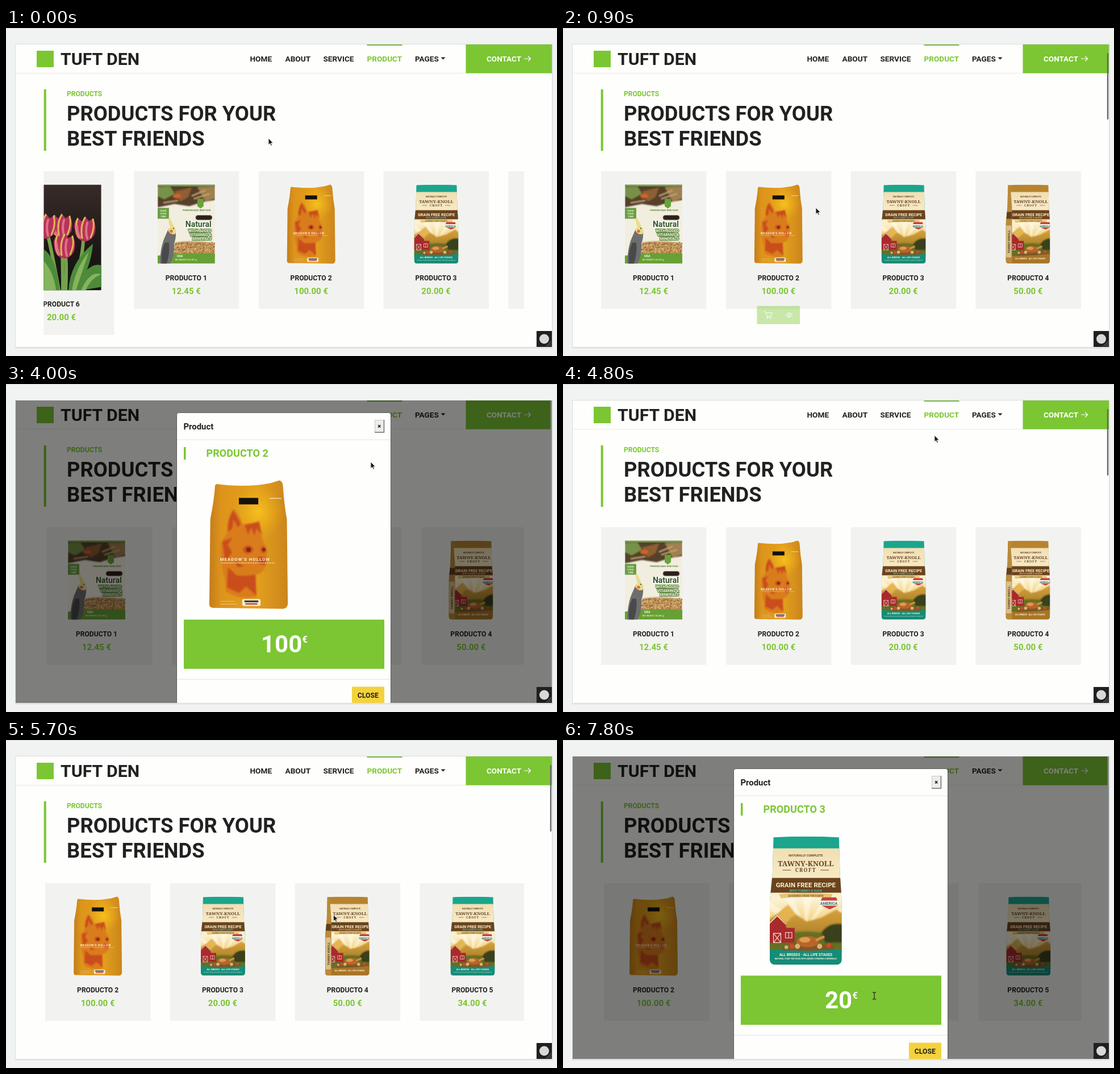
Write an HTML page that moves like this. It is 970x577 px and loops after 8 s.

```html
<!DOCTYPE html>
<html lang="en">
<head>
<meta charset="utf-8">
<title>Shop carousel</title>
<style>
html, body { margin: 0; width: 100%; height: 100%; overflow: hidden; background: #f0f3f2; }
svg { display: block; width: 100%; height: 100%; }
text { font-family: Roboto, sans-serif; font-weight: 700; white-space: pre; }
.mid { text-anchor: middle; }
.serif { font-family: "Noto Serif", serif; }
.line { fill: none; stroke-linecap: round; stroke-linejoin: round; }
</style>
</head>
<body>
<svg viewBox="0 0 970 577">
<defs>
  <clipPath id="track"><rect x="66.5" y="240" width="845.5" height="315"/></clipPath>
  <clipPath id="page"><rect x="17" y="29" width="944" height="532"/></clipPath>
  <clipPath id="birdClip"><rect width="101" height="139"/></clipPath>
  <clipPath id="bagClip"><path d="M4 1Q39-1 75 1L76 40 78 70V134Q77 139 72 139H6Q1 139 0 134V70L3 40Z"/></clipPath>
  <clipPath id="tulipClip"><rect width="139.5" height="186"/></clipPath>
  <filter id="soft"><feGaussianBlur stdDeviation=".9"/></filter>
  <linearGradient id="gold"><stop offset="0" stop-color="#c47d1b"/><stop offset=".15" stop-color="#dd941b"/><stop offset=".6" stop-color="#e3a01c"/><stop offset="1" stop-color="#cb851c"/></linearGradient>
  <radialGradient id="glow"><stop offset="0" stop-color="#f5c01d"/><stop offset="1" stop-color="#f0b01a" stop-opacity="0"/></radialGradient>
  <linearGradient id="dark" x2="0" y2="1"><stop offset="0" stop-color="#382c29"/><stop offset=".6" stop-color="#1d1715"/><stop offset="1" stop-color="#121510"/></linearGradient>
  <linearGradient id="sky" x2="0" y2="1"><stop offset="0" stop-color="#f1dfb2"/><stop offset=".5" stop-color="#fbf1d2"/><stop offset=".7" stop-color="#f4d583"/></linearGradient>
  <linearGradient id="peak" x2="0" y2="1"><stop offset="0" stop-color="#dda63e"/><stop offset=".5" stop-color="#b98b2f"/><stop offset="1" stop-color="#59611f"/></linearGradient>

  <g id="bird" clip-path="url(#birdClip)">
    <rect width="101" height="139" fill="#f2eedf"/>
    <g filter="url(#soft)">
      <path d="M0 0H101V27L78 31 56 38 30 34 0 40Z" fill="#54402c"/>
      <path d="M0 4L22 3 30 16 12 26 0 20Z" fill="#77914a"/>
      <path d="M70 4L101 3V24L84 30Z" fill="#a08050"/>
      <path d="M30 12L60 5 54 22 40 30Z" fill="#8d5e32"/>
      <ellipse cx="34" cy="20" rx="7" ry="4" fill="#d2622c"/>
      <path d="M60 20L84 10M64 25L92 16M10 32L36 28" stroke="#c6a872" stroke-width="2"/>
      <path d="M30 102Q60 97 101 103V126H30Z" fill="#bd9055"/>
    </g>
    <rect width="101" height="3" fill="#6fa541"/>
    <path d="M70 25H81V38L75.500 42 70 38Z" fill="#68a33a"/>
    <rect y="41" width="20" height="19" fill="#6a9f45"/>
    <g class="mid" fill="#e9f2dc" font-size="4.200"><text x="10" y="47">GOOD</text><text x="10" y="52">FOOD</text><text x="10" y="57">TIME</text></g>
    <text x="44" y="46" font-size="3.900" fill="#518a2e">PREMIUM DAILY BIRD FOOD</text>
    <g id="seeds"></g>
    <path d="M0 125Q50 118 101 122V139H0Z" fill="#67a034"/>
    <rect x="67" y="54" width="29" height="8" rx="4" fill="#2c211b" stroke="#8d7864"/>
    <g text-anchor="end" paint-order="stroke" stroke-width="2">
      <text x="95" y="74.500" font-size="14" fill="#36572a" stroke="#fff">Natural</text>
      <g font-size="6.900" fill="#f1f5e2" stroke="#5c8440"><text x="95" y="83.500">WITH ADDED</text><text x="95" y="90.500">VITAMINS &amp;</text><text x="95" y="97.500">MINERALS</text></g>
    </g>
    <text x="34" y="127.500" font-size="5.500" fill="#fff">USA</text>
    <text x="31" y="133" font-size="3.300" fill="#dcecc8">NET WEIGHT 2 LB (907 g)</text>
    <path d="M19 78Q29 74 32 82 33 94 29 104 31 124 22 139H4Q5 110 12 94Z" fill="#6f6e6e"/>
    <path d="M13 102Q5 118 7 139H16Q22 120 20 102Z" fill="#48494b"/>
    <path d="M22 75Q18 65 20 56 25 65 29 74 35 79 31 87 22 89 18 80Z" fill="#eadc8c"/>
    <circle cx="24" cy="82" r="2.800" fill="#dc7434"/><circle cx="28" cy="77" r="1" fill="#222"/>
  </g>

  <g id="cat">
    <path d="M8 4Q40 8 66 3L76 0Q80 1 80 9 81 26 84 42L85 134Q84 139 80 139L4 138Q0 138 0 134L1 42Q5 22 6 8 6 4 8 4Z" fill="url(#gold)"/>
    <ellipse cx="53" cy="34" rx="28" ry="30" fill="url(#glow)"/>
    <g filter="url(#soft)">
      <path d="M26 31Q32 35 36 48L47 46 54 44Q55 57 58 65L63 76 62 91Q58 101 50 102L51 126Q30 130 18 120L17 108Q10 85 13 66L20 56Q20 38 26 31Z" fill="#d97d1d"/>
      <g fill="#c8461a" opacity=".85">
        <path d="M26 32Q19 42 20 56L25 52 26 42 31 51 34 47ZM38 48L54 45 57 59 51 52 49 60 45 51 42 59ZM14 66L25 62 20 70 25 78 17 88Z"/>
        <path d="M20 94L30 103 42 103 50 102 51 125 40 115 32 122 19 116ZM28 87L38 93 30 94ZM53 82L62 84 60 92 53 90Z"/>
        <ellipse cx="42" cy="75" rx="5.500" ry="4.500"/><ellipse cx="58.500" cy="75" rx="3" ry="4"/>
      </g>
    </g>
    <g fill="#862a14"><circle cx="42.500" cy="75" r="2.500"/><circle cx="59" cy="75" r="1.800"/></g>
    <rect x="32" y="19" width="21" height="7" fill="#15120c"/>
    <path d="M65 19.500H78" stroke="#f9e7bc" stroke-width=".8"/>
    <text x="11.500" y="87" font-size="4.700" letter-spacing=".7" fill="#fff1d8">MEADOW'S HOLLOW</text>
    <path d="M13 89.500H71" stroke="#f8d9a8" stroke-width=".7" stroke-dasharray="2 .6"/>
    <path d="M12 131H28M12 134H30" stroke="#e4b870" stroke-width=".8"/>
    <rect x="35.500" y="128.500" width="20" height="7.500" rx="2" fill="#f3ead8"/>
    <rect x="38" y="130" width="15" height="2" fill="#4b3a2c"/><rect x="39" y="133" width="13" height="1.500" fill="#b64a33"/>
  </g>

  <g id="scene">
    <rect y="13" width="78" height="111" fill="url(#sky)"/>
    <g filter="url(#soft)">
      <path d="M39 100L0 70V80ZM39 100L14 64H24ZM39 100L36 64H46ZM39 100L60 64H70ZM39 100L78 78V88Z" fill="#fffbea" opacity=".6"/>
      <path d="M-2 90L8 84 20 74 28 84 40 92 56 88 72 79 80 84V127H-2Z" fill="url(#peak)"/>
      <path d="M20 75L28 85 23 88 17 95 8 86Z" fill="#eabb56" opacity=".8"/>
      <path d="M-2 111Q30 100 54 104L80 100V127H-2Z" fill="#657024"/>
      <path d="M56 104Q64 92 80 95V115H60Z" fill="#38401b"/>
    </g>
    <path d="M0 93L8 86 17 94 18 99H27V115H0Z" fill="#a92a2c"/>
    <path d="M0 94L8 86 17 95" stroke="#f3e6dc" class="line" stroke-width=".8"/>
    <path d="M4 105H12V115H4ZM4 105L12 115M12 105L4 115M17 104H24V110H17ZM20.500 104V110" stroke="#f4dfd4" stroke-width=".7" fill="none"/>
    <path d="M14 121Q26 113 40 115L70 118V126H14Z" fill="#7c5a27"/>
    <ellipse cx="41" cy="114" rx="12" ry="6" fill="#b9642a"/><ellipse cx="38" cy="112" rx="6" ry="3" fill="#df9a50"/>
    <path d="M51 112L58 109" stroke="#d88a44" stroke-width="3" stroke-linecap="round"/>
    <g fill="#cf4b2c"><circle cx="24" cy="119" r="2.500"/><circle cx="64" cy="118" r="2.500"/></g>
    <g fill="#d9b270"><circle cx="30" cy="119" r="2.800"/><circle cx="54" cy="119" r="2.800"/><circle cx="18" cy="120" r="2"/></g>
    <g class="mid" fill="#644329">
      <text x="39" y="22" font-size="3.400">NATURALLY COMPLETE</text>
      <text class="serif" x="39" y="32.500" font-size="7.800">TAWNY-KNOLL</text>
      <text class="serif" x="39" y="38.500" font-size="5.400" letter-spacing=".9">CROFT</text>
    </g>
    <path d="M14 36.500H23M55 36.500H64" stroke="#8b6840" stroke-width=".8"/>
    <rect y="45" width="78" height="16" fill="#6a431d"/>
    <text class="mid" x="39" y="55" font-size="7.100" fill="#fbefcd">GRAIN FREE RECIPE</text>
    <path d="M10 62.500Q39 60 68 62.500L66 67Q39 64.500 12 67Z" fill="#e6c578"/>
    <text class="mid" x="39" y="65.500" font-size="2.800" fill="#815d29">GOODNESS FROM THE EARTH</text>
    <path d="M57 66H72L73.500 70V75L65 79 55 74.500V70Z" fill="#c9403e"/>
    <rect x="54" y="69.500" width="20" height="5.500" fill="#f7f3e5"/>
    <text class="mid" x="64" y="74" font-size="4.300" fill="#28786f">AMERICA</text>
  </g>
  <g id="teal" clip-path="url(#bagClip)">
    <rect width="78" height="139" fill="#1ba58d"/>
    <use href="#scene"/>
    <text class="mid" x="39" y="59.700" font-size="3.500" fill="#3fc3b0">WITH TURKEY &amp; DUCK</text>
    <path d="M0 122Q39 126 78 122V139H0Z" fill="#168c78"/>
    <g class="mid" fill="#f5f4df"><text x="39" y="129.500" font-size="4">ALL BREEDS · ALL LIFE STAGES</text><text x="39" y="133" font-size="2.300">NATURAL FOOD FOR DOGS WITH ADDED VITAMINS &amp; MINERALS</text></g>
  </g>
  <g id="brown" clip-path="url(#bagClip)">
    <rect width="78" height="139" fill="#b8832e"/>
    <use href="#scene" x="5"/>
    <text class="mid" x="44" y="59.700" font-size="3.300" fill="#e5b24b">WITH CHICKEN &amp; SALMON</text>
    <path d="M0 125Q39 127 78 122V139H0Z" fill="#a87528"/>
    <path d="M0 0H8L11 40V139H0Z" fill="#b98a3c"/>
    <path d="M1 48H10.500V60H1Z" fill="#5f3f1d"/><path d="M1 72H10V128H1Z" fill="#d9bf8c"/>
    <text transform="translate(8 121) rotate(-90)" font-size="6" fill="#5d4226">TAWNY-KNOLL</text>
    <text class="mid" x="43" y="131" font-size="3.700" fill="#fff0cc">ALL BREEDS · ALL LIFE STAGES</text>
  </g>

  <g id="bloom">
    <path d="M-19-4Q-20-14-13-20L-5-14 0-23 7-15 14-19Q21-8 17 8 10 21 0 21-12 20-17 8Z" fill="#b8325a"/>
    <path d="M-13-19Q-19-4-11 14M0-21Q-9-6-5 15M14-18Q18-4 10 14" class="line" stroke="#dcb658" stroke-width="3"/>
    <path d="M4-12Q0 2 4 16M-14-6Q-14 4-9 14" class="line" stroke="#de7189" stroke-width="4"/>
  </g>
  <g id="tulip" clip-path="url(#tulipClip)">
    <rect width="140" height="186" fill="url(#dark)"/>
    <path d="M46 90Q55 130 65 186M70 98Q72 130 72 186M77 125Q79 150 77 186M108 98Q106 140 86 186" class="line" stroke="#74a34b" stroke-width="6"/>
    <path d="M36 112Q62 128 66 186H36ZM82 186Q84 138 125 104 121 150 95 186ZM92 186Q115 134 140 142V180L104 186Z" fill="#4d8b3a"/>
    <path d="M36 132Q56 152 60 186H36ZM88 186Q95 145 118 118 107 150 95 186ZM104 186Q120 150 140 158 122 164 112 186Z" fill="#85b45c"/>
    <use href="#bloom" x="70" y="74"/><use href="#bloom" x="42" y="74"/><use href="#bloom" x="111" y="79"/><use href="#bloom" x="75" y="109"/>
  </g>
  <g id="tools">
    <path d="M354 488H356.500L359 496H366L368 490H357.500" class="line" stroke="#fff"/>
    <circle cx="360" cy="499" r="1.200" fill="none" stroke="#fff"/><circle cx="365" cy="499" r="1.200" fill="none" stroke="#fff"/>
  </g>
  <g id="eye" class="line"><path d="M392 494Q398 486 404 494 398 502 392 494Z"/><circle cx="398" cy="494" r="2"/></g>
</defs>

<rect width="970" height="577" fill="#f0f3f2"/>
<rect width="970" height="1" fill="#d9dcdb"/>
<rect x="16" y="29" width="947" height="535" fill="#e3e6e5"/>
<rect x="16.500" y="28.500" width="945" height="533" fill="#fefefc" stroke="#dadddc"/>
<g clip-path="url(#page)">
  <path d="M17 79.500H961" stroke="#e9ebea"/>
  <rect x="54" y="40" width="30" height="29" fill="#7bc632"/>
  <text x="96" y="65" font-size="30.300" fill="#212121">TUFT DEN</text>
  <g font-size="13.600" fill="#212121">
    <text x="429.500" y="59">HOME</text><text x="491.500" y="59">ABOUT</text><text x="558.500" y="59">SERVICE</text>
    <text x="635.500" y="59" fill="#7bc632">PRODUCT</text><text x="720" y="59">PAGES</text>
  </g>
  <path d="M765.500 51.500H773.500L769.500 55.500Z" fill="#212121"/>
  <rect x="635.500" y="29" width="62" height="2" fill="#7bb948"/>
  <rect x="809.500" y="29" width="151.500" height="50.500" fill="#7bc632"/>
  <text x="846" y="59" font-size="13.500" fill="#fff">CONTACT</text>
  <path d="M912.500 54H923.500M919.500 50L923.500 54 919.500 58" class="line" stroke="#fff" stroke-width="1.200"/>
  <rect x="66.700" y="108" width="4" height="108" fill="#7bc632"/>
  <text x="107" y="119.500" font-size="12.100" fill="#7bc632">PRODUCTS</text>
  <g font-size="36.400" fill="#212121"><text x="107" y="163">PRODUCTS FOR YOUR</text><text x="107" y="207">BEST FRIENDS</text></g>
  <g id="cards" clip-path="url(#track)"></g>
  <g id="bar">
    <g><rect x="341.500" y="478" width="75.500" height="32" fill="#7bc632"/><rect id="half" x="379" y="478" width="38" height="32" fill="#92d04f"/></g>
    <use href="#tools"/><use id="look" href="#eye"/>
  </g>
  <rect id="thumb" x="957.800" y="44" width="2.400" height="117" rx="1.200" fill="#666866"/>
  <g id="modal">
    <rect x="17" y="29" width="944" height="532" opacity=".5"/>
    <rect x="958.500" y="29" width="2.500" height="532" fill="#858784"/>
    <rect x="300.500" y="50.500" width="377" height="530" rx="4" fill="#fefefc" stroke="#5d5e5c"/>
    <path d="M301 98H677M301 519.500H677" stroke="#e2e5e7"/>
    <text x="312.500" y="79.500" font-size="14.900" fill="#212121">Product</text>
    <path d="M649.500 63.500H665V85H649.500Z" fill="#ececea" stroke="#c9c9c7"/><path d="M649 85H665.500V63" fill="none" stroke="#777" stroke-width="1.500"/>
    <text class="mid" x="657.200" y="78" font-size="11">×</text>
    <rect x="313" y="111" width="3.500" height="22" fill="#7bc632"/>
    <text id="name" x="352.500" y="128" font-size="18.100" fill="#7bc632"></text>
    <use id="photo"/>
    <rect x="313" y="414.500" width="353" height="86.500" fill="#7bc632"/>
    <text class="mid" x="490" y="472" font-size="42" fill="#fff"><tspan id="sum"></tspan><tspan font-size="17" dy="-17">€</tspan></text>
    <rect x="609" y="532.500" width="57" height="40" fill="#f4d23c"/>
    <text class="mid" x="637.300" y="551.500" font-size="12.200" fill="#212121">CLOSE</text>
  </g>
  <rect x="934" y="533" width="27" height="28" fill="#202020"/>
  <circle cx="947.500" cy="547" r="8.500" fill="#d8d8d8"/>
  <path d="M951 560L960 551M954.500 560L960 554.500M958 560L960 558" stroke="#999" stroke-width=".8"/>
</g>
<path id="arrow" d="M0 0V11.500L2.700 9.100 4.500 13.200 6.400 12.400 4.600 8.400H8.200Z" fill="#161616" stroke="#f4f4f4" stroke-width=".9"/>
<path id="beam" d="M-2.500-6Q0-6 0-4.500 0-6 2.500-6M0-4.500V4.500M-2.500 6Q0 6 0 4.500 0 6 2.500 6" class="line" stroke="#333" stroke-width="1.400"/>
</svg>
<script>
const $ = id => document.getElementById(id);
const LOOP = 8000, PITCH = 219.8, SLIDE = 850;

// name, photo, inset, price, height of the photo
const products = [
  ["PRODUCT 6", "tulip", 23, "20.00", 185],
  ["PRODUCTO 1", "bird", 42, "12.45", 139],
  ["PRODUCTO 2", "cat", 50, "100.00", 139],
  ["PRODUCTO 3", "teal", 54, "20.00", 139],
  ["PRODUCTO 4", "brown", 53, "50.00", 139],
  ["PRODUCTO 5", "teal", 54, "34.00", 139]
];
$("cards").innerHTML = products.map(([name, photo, inset, price, h]) => `<g>
  <rect class="back" y="252" width="185.5" height="${h + 103}" fill="#f2f3f0"/>
  <use href="#${photo}" x="${inset}" y="275.5"/>
  <text class="mid" x="92.5" y="${h + 305.3}" font-size="12.1" fill="#212121">${name}</text>
  <text class="mid" x="92.5" y="${h + 329}" font-size="15" fill="#7bc632">${price} €</text></g>`).join("");
const cards = [...$("cards").children];
const backs = document.querySelectorAll(".back");

let seed = 7;
const rnd = () => (seed = seed * 16807 % 2147483647) / 2147483647;
$("seeds").innerHTML = Array.from({ length: 130 }, () => {
  const x = 30 + rnd() * 71, y = 102 + rnd() * 20;
  return `<circle cx="${x.toFixed(1)}" cy="${y.toFixed(1)}" r="1.3" fill="${rnd() < .5 ? "#96683a" : "#d9b47a"}"/>`;
}).join("");

// CSS "ease": cubic-bezier(.25, .1, .25, 1)
function ease(x) {
  if (x <= 0) return 0;
  if (x >= 1) return 1;
  let lo = 0, hi = 1, s;
  for (let i = 0; i < 20; i++) {
    s = (lo + hi) / 2;
    if (.75 * s * (1 - s) + s ** 3 < x) lo = s; else hi = s;
  }
  return .3 * s * (1 - s) ** 2 + 3 * s * s * (1 - s) + s ** 3;
}

// time, x, y of the pointer
const path = [
  [0, 462, 194], [900, 445, 316], [1800, 406, 460], [2100, 398, 507], [3000, 398, 507],
  [3300, 549, 312], [3400, 549, 312], [3600, 609, 197], [3700, 609, 197], [3800, 620, 181],
  [3900, 620, 181], [4000, 642, 137], [4100, 642, 137], [4300, 655, 70], [4700, 655, 70],
  [5300, 649, 192], [5900, 540, 365], [6300, 427, 499], [6600, 406, 503], [7600, 406, 503],
  [7800, 548, 450], [LOOP, 548, 450]
];
function pointer(t) {
  const i = path.findIndex(p => p[0] > t), [t0, x0, y0] = path[i - 1], [t1, x1, y1] = path[i];
  const k = (t - t0) / (t1 - t0);
  return [x0 + (x1 - x0) * k, y0 + (y1 - y0) * k];
}

const show = (id, on) => $(id).setAttribute("display", on ? "inline" : "none");
const move = (el, x, y = 0, s = 1) => el.setAttribute("transform", `translate(${x} ${y}) scale(${s})`);

function draw(t) {
  const second = t >= 4700;
  const open = t >= 2500 && t < 4700 || t >= 7300;
  const shift = ease((t + 165) / SLIDE) - 1 + ease((t - 4960) / SLIDE);
  cards.forEach((c, i) => move(c, 67 + PITCH * (i - 1 - shift)));
  backs.forEach(b => b.setAttribute("x", open ? 5 : 0));

  const [x, y] = pointer(t);
  const fade = ease((t - (second ? 6020 : 775)) / 500);
  show("bar", fade > 0 && !open);
  $("bar").setAttribute("opacity", fade);
  move($("bar"), second ? .5 : 0, 18.5 * (1 - fade));
  const over = x > 379 && x < 418 && y > 478 && y < 510;
  show("half", over);
  $("look").setAttribute("stroke", over ? "#212121" : "#fff");

  show("thumb", t >= 400 && !open);
  show("modal", open);
  $("name").textContent = second ? "PRODUCTO 3" : "PRODUCTO 2";
  $("sum").textContent = second ? "20" : "100";
  $("photo").setAttribute("href", second ? "#teal" : "#cat");
  move($("photo"), second ? 364 : 358, 169.5, 1.625);

  const typing = open && y > 438 && y < 476;
  show("arrow", !typing);
  show("beam", typing);
  move($(typing ? "beam" : "arrow"), x, y);
}

const start = performance.now();
function tick() {
  const t = (performance.now() - start) % LOOP;
  draw(Math.floor(t / 100) * 100);
  requestAnimationFrame(tick);
}
tick();
</script>
</body>
</html>
```
